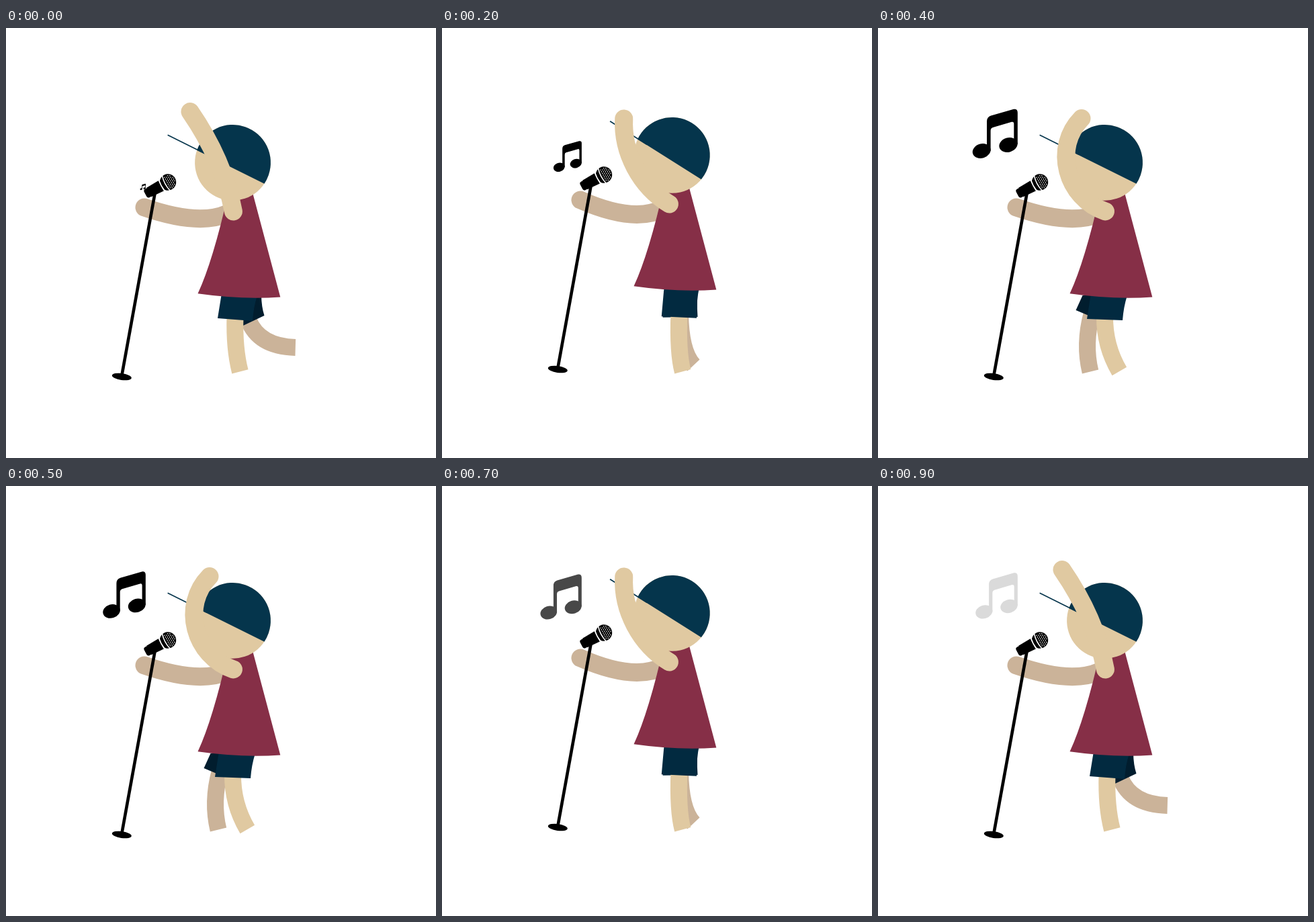
An HTML page with a canvas for the animation above (1 s loop, 640x640 px).

```html
<!DOCTYPE html>
<html lang="en">
<head>
<meta charset="utf-8">
<title>Singer</title>
<style>
html, body { margin: 0; width: 100%; height: 100%; overflow: hidden; background: #fff; }
canvas { display: block; width: 640px; height: 640px; }
</style>
</head>
<body>
<canvas id="stage" width="640" height="640"></canvas>
<script>
const ctx = document.getElementById('stage').getContext('2d');
const SKIN = '#e0c9a1', SKIN_BACK = '#cbb399', CAP = '#05354c', SHIRT = '#862f47';
const SHORTS = '#022a40', SHORTS_DARK = '#011d2e';

// body: lift, head angle, head x. arm: hand and two controls.
// reach: back arm control y, end y. legs: control, foot.
// shorts: top left x, top right x, bottom left, bottom right.
const back = {
  body: [0, 26.4, 337.5], reach: [295, 276],
  arm: [274, 124.5, 307.3, 172.8, 328.7, 222.3],
  leg1: [339.5, 477, 348.4, 511.3], short1: [320.5, 374, 315, 432, 367, 436],
  leg2: [376, 474, 430.8, 475.5], short2: [345, 380, 337, 450.5, 384.5, 428]
};
const step = {
  body: [-7, 30.5, 341], reach: [301, 279],
  arm: [266.5, 131.5, 282.5, 180.5, 306.5, 225.5],
  leg1: [349, 476, 355, 511.5], short1: [328, 383, 325, 429.5, 377, 433],
  leg2: [366, 489, 399.3, 492], short2: [335, 382, 332, 434.5, 384, 428]
};
const pass = {
  body: [-10.5, 32.1, 342.5], reach: [304, 279.5],
  arm: [275, 138.5, 254, 190, 283, 245],
  leg1: [352.5, 490, 361.5, 511], short1: [333, 382.5, 328.5, 429, 381, 430.5],
  leg2: [345, 475, 349.5, 512], short2: [328.5, 380, 325, 427, 377, 432]
};
const front = {
  body: [0, 26.4, 337.5], reach: [295, 276],
  arm: [303, 134.5, 260, 178, 280, 253],
  leg1: [337, 473, 359.3, 511], short1: [316.5, 371, 311, 433, 364, 435],
  leg2: [306, 470, 316, 511.5], short2: [304.5, 350, 294.5, 420, 342, 440]
};
const between = { body: [-11, 32.2, 342.3] };
for (const k in step)
  if (!between[k]) between[k] = step[k].map((v, i) => (v + pass[k][i]) / 2);

const POSES = [back, step, between, pass, front];
const NOTE_SIZE = [8.5, 23, 42, 62, 67, 63.5, 59.8, 61.3, 62.2, 62.5];
const NOTE_GREY = { 7: 72, 8: 146, 9: 218 };

function fill(color, draw) {
  ctx.beginPath();
  draw();
  ctx.fillStyle = color;
  ctx.fill();
}
function stroke(color, width, cap, draw) {
  ctx.beginPath();
  draw();
  ctx.strokeStyle = color;
  ctx.lineWidth = width;
  ctx.lineCap = cap;
  ctx.stroke();
}
function poly(...p) {
  ctx.moveTo(p[0], p[1]);
  for (let i = 2; i < p.length; i += 2) ctx.lineTo(p[i], p[i + 1]);
  ctx.closePath();
}
function dot(x, y, rx, ry = rx, turn = 0) {
  ctx.moveTo(x + rx * Math.cos(turn), y + rx * Math.sin(turn));
  ctx.ellipse(x, y, rx, ry, turn, 0, 7);
}
function placed(x, y, deg, draw) {
  ctx.save();
  ctx.translate(x, y);
  ctx.rotate(deg * Math.PI / 180);
  draw();
  ctx.restore();
}

function drawLeg([cx, cy, fx, fy], [tl, tr, lx, ly, rx, ry], lift, skin, cloth, legFirst) {
  const leg = () => stroke(skin, 25, 'butt', () => {
    ctx.moveTo((lx + rx) / 2, (ly + ry) / 2 - 5);
    ctx.quadraticCurveTo(cx, cy, fx, fy);
  });
  leg();
  fill(cloth, () => {
    ctx.moveTo(tl, 398 + lift);
    ctx.lineTo(lx, ly);
    ctx.lineTo(rx, ry);
    ctx.quadraticCurveTo((tr + rx) / 2 - 2, 415 + lift, tr, 398 + lift);
  });
}

function drawMic() {
  stroke('#000', 4.6, 'butt', () => { ctx.moveTo(222, 244); ctx.lineTo(172.2, 518); });
  fill('#000', () => dot(172.3, 519, 14.6, 5, 0.14));
  placed(241, 229.5, -28, () => {
    fill('#000', () => ctx.roundRect(-38, -7, 12, 14, 3.5));
    fill('#000', () => poly(-32, -7.6, -11.5, -8.6, -11.5, 8.6, -32, 7.6));
    fill('#000', () => dot(0, 0, 12.2));
    stroke('#fff', 1.6, 'butt', () => {
      ctx.moveTo(-10.3, -9); ctx.quadraticCurveTo(-12, 0, -10.3, 9);
      ctx.moveTo(-3, -12.5); ctx.quadraticCurveTo(-6.5, 0, -3, 12.5);
    });
    fill('#fff', () => {
      for (let x = 0; x < 5; x++)
        for (let y = -3; y <= 3; y++) {
          const px = -1 + x * 2.7, py = y * 2.9 + (x % 2 ? 1.4 : 0);
          if (Math.hypot(px, py) < 10.6) dot(px, py, 0.75);
        }
    });
  });
}

function drawShirt() {
  fill(SHIRT, () => {
    ctx.moveTo(285.5, 395.3);
    ctx.quadraticCurveTo(308, 347, 331, 245);
    ctx.lineTo(367.5, 247);
    ctx.lineTo(408.3, 400.5);
    ctx.quadraticCurveTo(350, 404.5, 285.5, 395.3);
  });
}

function drawHead() {
  const r = 56.4, drop = 7.1, a = Math.asin(drop / r);
  fill(SKIN, () => dot(0, 0, r));
  fill(CAP, () => ctx.arc(0, 0, r, Math.PI - a, a));
  stroke(CAP, 1.7, 'butt', () => { ctx.moveTo(-105, drop - 0.8); ctx.lineTo(-40, drop - 0.8); });
}

function drawNote(size, grey) {
  const s = size / 67;
  ctx.save();
  ctx.translate(208, 248);
  ctx.scale(s, s);
  ctx.translate(-208, -248);
  fill(`rgb(${grey},${grey},${grey})`, () => {
    ctx.moveTo(162, 183);
    ctx.lineTo(162, 139);
    ctx.quadraticCurveTo(162, 132.5, 168, 130.5);
    ctx.lineTo(202, 120.8);
    ctx.quadraticCurveTo(207.8, 120, 207.8, 126);
    ctx.lineTo(207.8, 173);
    ctx.lineTo(202.3, 173);
    ctx.lineTo(202.3, 143);
    ctx.quadraticCurveTo(202.3, 139, 199, 139.8);
    ctx.lineTo(171, 148);
    ctx.quadraticCurveTo(167.6, 149, 167.6, 153);
    ctx.lineTo(167.6, 183);
    ctx.closePath();
  });
  fill(ctx.fillStyle, () => dot(154.2, 183, 13.7, 10.6, -0.3));
  fill(ctx.fillStyle, () => dot(194, 174, 13.9, 10.6, -0.3));
  ctx.restore();
}

function draw(tick) {
  const pose = POSES[tick < 5 ? tick : 9 - tick];
  const [lift, tilt, headX] = pose.body;
  const [reachY, endY] = pose.reach;
  const [hx, hy, ...bend] = pose.arm;
  const far = lift ? '#02273c' : SHORTS_DARK;

  ctx.fillStyle = '#fff';
  ctx.fillRect(0, 0, 640, 640);
  drawNote(NOTE_SIZE[tick], NOTE_GREY[tick] || 0);
  drawLeg(pose.leg2, pose.short2, lift, SKIN_BACK, far);
  drawLeg(pose.leg1, pose.short1, lift, SKIN, SHORTS);

  placed(0, lift, 0, () => {
    stroke(SKIN_BACK, 27, 'round', () => {
      ctx.moveTo(206, 267);
      ctx.quadraticCurveTo(287, reachY, 330, endY);
    });
    drawMic();
    drawShirt();
    placed(headX, 200.4, tilt, drawHead);
  });
  stroke(SKIN, 27, 'round', () => {
    ctx.moveTo(hx, hy);
    ctx.bezierCurveTo(...bend, 338.4, 273 + lift);
  });
}

function loop() {
  draw(Math.floor(performance.now() / 100) % 10);
  requestAnimationFrame(loop);
}
loop();
</script>
</body>
</html>
```
